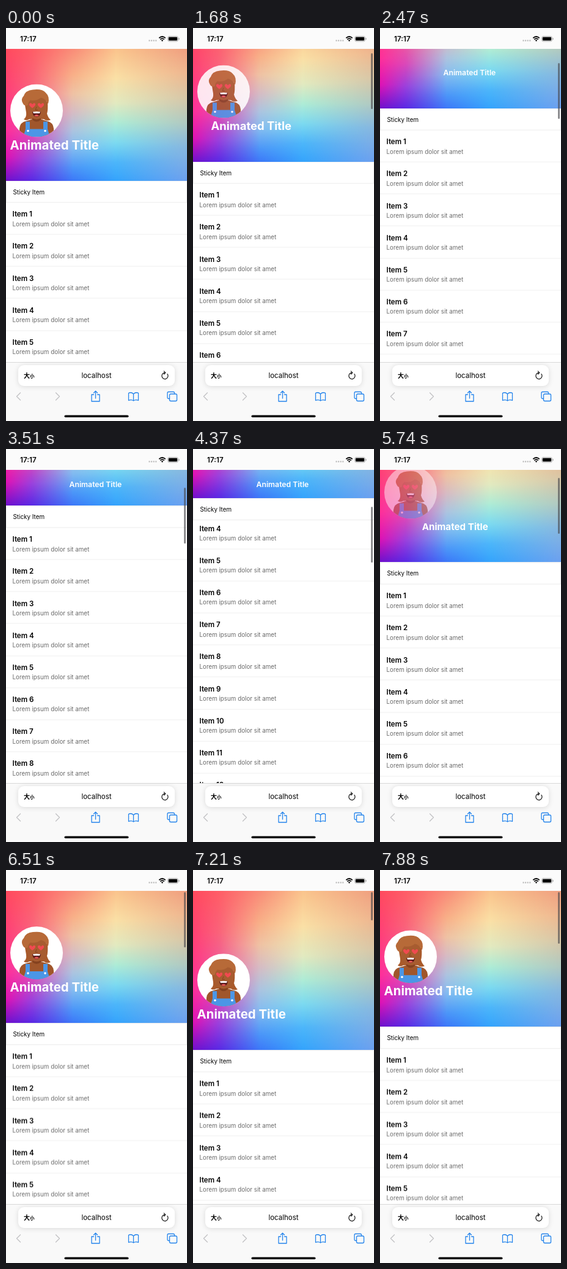
Write an HTML page that moves like this. It is 296x640 px and loops after 7.99 s.

```html
<!DOCTYPE html>
<html lang="en">
<head>
<meta charset="utf-8">
<title>Animated header</title>
<style>
html, body { margin: 0; width: 100%; height: 100%; overflow: hidden; background: #fff; }
body { position: relative; font-family: Inter, "Noto Sans", sans-serif; color: #000; }
#stage { position: absolute; left: 0; top: 0; width: 296px; height: 640px; overflow: hidden; background: #fff; }
#stage div, #stage svg { position: absolute; box-sizing: border-box; }
.text { height: 20px; line-height: 20px; white-space: nowrap; }
#list { left: 0; top: 0; width: 296px; will-change: transform; }
.item { left: 0; width: 296px; height: 52.17px; border-bottom: 1px solid #efefef; }
.item .name { left: 10.5px; top: 8.3px; font-size: 11.6px; font-weight: 600; }
.item .note { left: 10.5px; top: 24.6px; font-size: 9.8px; color: #6a6a6a; }
#sticky { left: 0; top: 0; width: 296px; height: 36px; background: #fff; border: 1px solid #ececec; }
#sticky .text { left: 10.5px; top: 7.4px; font-size: 9.85px; }
#header { left: 0; top: 34px; width: 296px; overflow: hidden; }
#cover { left: 0; bottom: 0; width: 296px; }
/* vertical blends, each fading in over the one to its left */
#cover div {
  inset: 0;
  -webkit-mask-image: linear-gradient(90deg, transparent var(--from), #000 var(--to));
  mask-image: linear-gradient(90deg, transparent var(--from), #000 var(--to));
}
#cover div:nth-child(1) { --from: -2%; --to: -1%; background: linear-gradient(#ff4a5e, #ff3f78 32%, #ff2f9a 62%, #e012b4 82%, #7010cc); }
#cover div:nth-child(2) { --from: 0%; --to: 14%; background: linear-gradient(#ff5c66, #fa627a 26%, #f05c9c 48%, #dc48b8 66%, #9c40dc 83%, #5a28e4); }
#cover div:nth-child(3) { --from: 14%; --to: 37%; background: linear-gradient(#f98c78, #f8b088 20%, #efc2a4 34%, #d6bcc4 48%, #acc4e0 62%, #84bcf0 75%, #4c96f8 90%, #3c78f8); }
#cover div:nth-child(4) { --from: 37%; --to: 61%; background: linear-gradient(#fac48c, #fae0a6 22%, #e2eac0 41%, #aeecd6 56%, #7cdaf0 71%, #4cb6fa 86%, #34a4fc); }
#cover div:nth-child(5) { --from: 61%; --to: 98%; background: linear-gradient(#f0a080, #efb890 18%, #d8c8a8 37%, #b0cac2 56%, #86b8e0 74%, #6aa0f0); }
#face { left: 7px; width: 86px; height: 86px; }
#title { left: 0; top: -10px; font-size: 20.4px; font-weight: 700; color: #fff; transform-origin: 0 50%; }
#bar { left: 291px; width: 3px; border-radius: 2px; background: rgba(70, 70, 75, .62); }
#status { left: 0; top: 0; width: 296px; height: 34px; background: #fbfbfb; }
#status .text { left: 23px; top: 7.8px; font-size: 11.7px; font-weight: 600; }
#tools { left: 0; top: 544px; width: 296px; height: 96px; background: #f9f9f9; border-top: 1px solid #d9d9d9; }
#address { left: 20px; top: 549px; width: 256px; height: 34px; border-radius: 9px; background: #fff; box-shadow: 0 1px 8px rgba(0, 0, 0, .13); }
#host { left: 0; top: 556px; width: 296px; text-align: center; font-size: 11.5px; }
#size { left: 29px; top: 556px; font: 700 10px/20px "Noto Sans CJK SC", "Noto Sans CJK JP", "Noto Sans CJK", sans-serif; }
#size small { font-size: 7.5px; }
#icons { left: 0; top: 0; width: 296px; height: 640px; }
</style>
</head>
<body>
<div id="stage">
  <div id="list"></div>
  <div id="sticky"><div class="text">Sticky Item</div></div>
  <div id="header">
    <div id="cover"><div></div><div></div><div></div><div></div><div></div></div>
    <svg id="face" viewBox="0 0 86 86">
      <clipPath id="round"><circle cx="43" cy="43" r="43"/></clipPath>
      <circle cx="43" cy="43" r="43" fill="#fff"/>
      <g clip-path="url(#round)">
        <path d="M23 28H61Q62 42 60 48Q62 55 66 58Q60 61 55 57H31Q26 60 22 57Q27 54 26 46Z" fill="#a95a2b"/>
        <path d="M15 86V72Q16 62 26 60L36 57V48H50V57L60 60Q70 62 71 72V86Z" fill="#a0562b"/>
        <path d="M36 54Q43 60 50 54V58Q43 64 36 58Z" fill="#85421f"/>
        <path d="M28 27Q28 17 43 17Q59 17 59 29V40Q58 56 43 57Q29 56 28 40Z" fill="#a75c30"/>
        <path d="M20 30Q17 24 22 19Q25 10 37 9Q52 7 58 14Q65 20 62 32Q57 23 50 22Q42 28 33 26Q29 29 29 34Q23 37 20 30Z" fill="#b76a38"/>
        <path id="heart" d="M36 39Q30 35 31 32Q34 29 36 33Q39 29 41 32Q42 35 36 39Z" fill="#f04a50"/>
        <use href="#heart" x="14"/>
        <path d="M43 37L41 42H45" fill="none" stroke="#85421f"/>
        <path d="M36 45Q43 44 50 45Q49 53 43 53Q37 53 36 45Z" fill="#5a1818"/>
        <path d="M37 45Q43 44 49 45L48 47.5H38Z" fill="#fff"/>
        <path d="M39 51Q43 48 47 51Q43 54 39 51Z" fill="#ee5a5a"/>
        <path d="M25 61H32V73H54V61H61V73L65 86H21L25 73Z" fill="#4b96e6"/>
        <g fill="#fff"><circle cx="29" cy="76" r="1.8"/><circle cx="57" cy="76" r="1.8"/></g>
      </g>
    </svg>
    <div id="title" class="text">Animated Title</div>
  </div>
  <div id="bar"></div>
  <div id="status"><div class="text">17:17</div></div>
  <div id="tools"></div>
  <div id="address"></div>
  <div id="size" class="text">大<small>小</small></div>
  <div id="host" class="text">localhost</div>
  <svg id="icons" viewBox="0 0 296 640" fill="none" stroke-linecap="round" stroke-linejoin="round">
    <path d="M234.5 20.5H246" stroke="#bbb" stroke-width="2.4" stroke-dasharray="0 3.6"/>
    <g stroke="#000" stroke-width="1.7" stroke-linecap="butt">
      <path d="M250.3 16.4Q255.5 11.6 260.7 16.4"/>
      <path d="M252.2 18.6Q255.5 15.6 258.8 18.6"/>
    </g>
    <path d="M253.7 20L255.5 22L257.3 20Q255.5 18.6 253.7 20Z" fill="#000"/>
    <rect x="264.5" y="13.5" width="17" height="8.4" rx="2.5" stroke="#aaa" stroke-width=".8"/>
    <rect x="265.8" y="14.8" width="14.4" height="5.8" rx="1.4" fill="#000"/>
    <path d="M283 16.6V18.8" stroke="#aaa" stroke-width="1.2"/>
    <path d="M264 563.5A5 5.2 0 1 1 260 561.3M258.3 558.8L260.8 561.3L258.3 563.8" stroke="#111" stroke-width="1.2"/>
    <path d="M23.5 594L17.5 600L23.5 606M81.5 594L87.5 600L81.5 606" stroke="#c3c3c5" stroke-width="1.4"/>
    <g stroke="#2484ec" stroke-width="1.3">
      <path d="M143.5 597H140V608H153V597H149.5M146.5 603V591.5M143.5 594.3L146.5 591.3L149.5 594.3"/>
      <path d="M208.5 596Q205 592.5 200.5 594.5V606.5Q205 604.5 208.5 607Q212 604.5 216.5 606.5V594.5Q212 592.5 208.5 596V607"/>
      <rect x="267.5" y="596" width="12" height="11.5" rx="2"/>
      <path d="M267 603.5H265.5Q264 603.5 264 602V594.5Q264 592.5 266 592.5H273.5Q275.5 592.5 275.5 594.5V595.5"/>
    </g>
    <rect x="95.5" y="630.5" width="105" height="3.6" rx="1.8" fill="#000"/>
  </svg>
</div>
<script>
const LOOP = 7990, TOP = 34, TALL = 214.5, SHORT = 46, LIST = 284.5, ROW = 52.17;
const $ = id => document.getElementById(id);
const clamp = (v, lo, hi) => Math.min(hi, Math.max(lo, v));

// bursts of movement: start, end, steps
const bursts = [
  [1360, 2130, 8], [2240, 2810, 6], [3300, 4060, 8], [4160, 4370, 3], [4540, 5300, 8],
  [5410, 6170, 8], [6270, 6510, 3], [6780, 7550, 8], [7650, 7880, 3]
];

// scroll offset over time: ms, px
const path = [
  [1250, 0], [1360, 3], [1690, 31], [2130, 85], [2810, 138], [3300, 143], [3517, 156],
  [4060, 285], [4370, 330], [4540, 320], [5100, 212], [5736, 64], [6170, 5], [6300, -5],
  [6510, -.6], [6780, -4], [7300, -50], [7440, -54], [7660, -22], [7880, -6.7]
];

function snap(t) {
  let at = 0;
  for (const [start, end, n] of bursts) {
    if (t < start) break;
    const step = (end - start) / (n - 1);
    at = start + step * Math.min(n - 1, Math.floor((t - start + 12) / step));
  }
  return at;
}

// monotone cubic through the path
const slope = i => (path[i + 1][1] - path[i][1]) / (path[i + 1][0] - path[i][0]);
function tangent(i) {
  if (i === 0 || i === path.length - 1) return 0;
  const a = slope(i - 1), b = slope(i);
  return a * b > 0 ? 2 * a * b / (a + b) : 0;
}
function scrollAt(t) {
  if (t <= path[0][0]) return 0;
  const i = Math.min(path.length - 2, path.findLastIndex(p => p[0] <= t));
  const [x0, y0] = path[i], [x1, y1] = path[i + 1];
  const w = x1 - x0, u = clamp((t - x0) / w, 0, 1), v = 1 - u;
  return y0 * (1 + 2 * u) * v * v + y1 * u * u * (3 - 2 * u) +
    w * u * v * (tangent(i) * v - tangent(i + 1) * u);
}

function draw(t) {
  const s = scrollAt(snap(t));
  const p = clamp((s - 11.5) / 82, 0, 1);
  const height = Math.max(SHORT, TALL - s);

  $("list").style.transform = `translateY(${LIST - s}px)`;
  $("sticky").style.transform = `translateY(${TOP + height}px)`;
  $("header").style.height = height + "px";
  $("cover").style.height = Math.max(TALL, TALL - s) + "px";

  $("face").style.transform = `translateY(${57.5 - s}px)`;
  $("face").style.opacity = 1 - p ** 1.4;

  const y = Math.max(23.3, 156.5 - s);
  $("title").style.transform = `translate(${6.5 + 97 * p}px, ${y}px) scale(${1 - .4 * p})`;
  $("title").style.fontWeight = p < 1 ? 700 : 600;

  const bar = $("bar").style;
  bar.display = t < bursts[0][0] ? "none" : "block";
  bar.top = 36 + Math.max(0, s) * .175 + "px";
  bar.height = 91 + Math.min(0, s) + "px";
}

for (let i = 0; i < 14; i++) {
  const item = document.createElement("div");
  item.className = "item";
  item.style.top = i * ROW + "px";
  item.innerHTML = `<div class="text name">Item ${i + 1}</div><div class="text note">Lorem ipsum dolor sit amet</div>`;
  $("list").append(item);
}

const begin = performance.now();
function tick() {
  draw((performance.now() - begin) % LOOP);
  requestAnimationFrame(tick);
}
tick();
</script>
</body>
</html>
```
